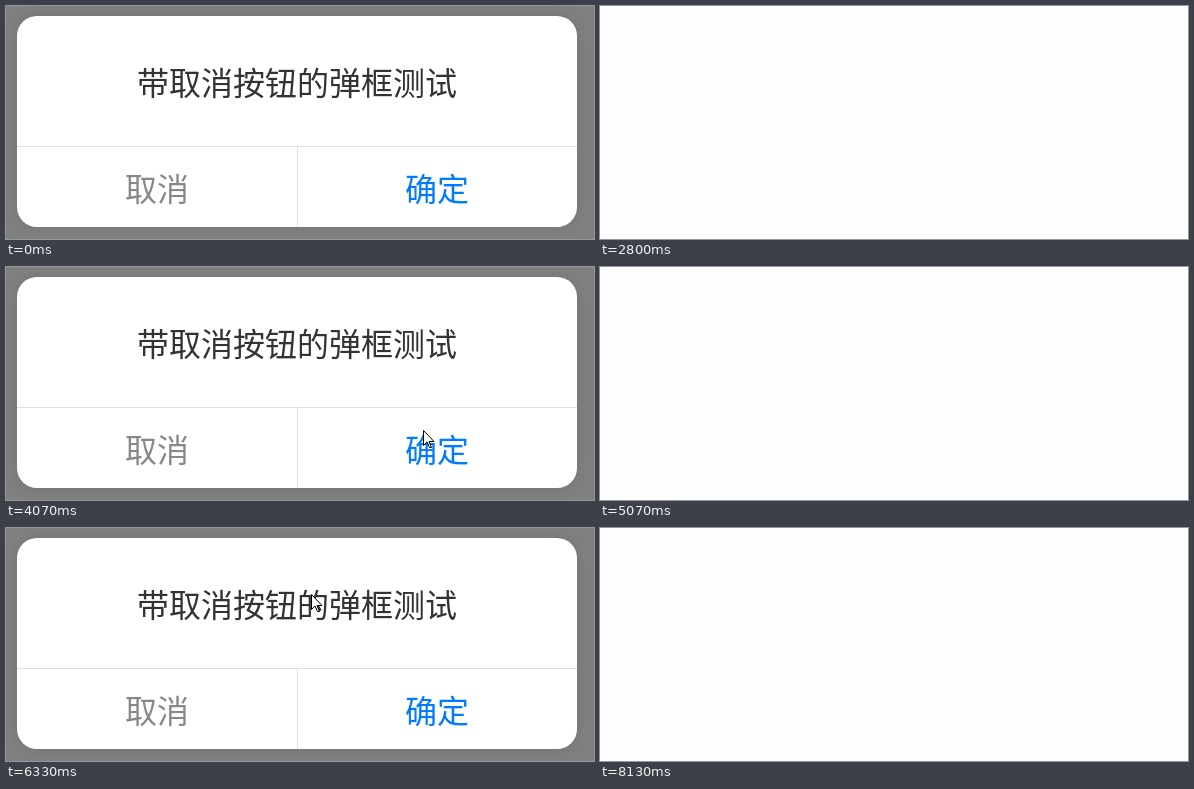
An HTML page with a canvas for the animation above (8790 ms loop, 588 by 233 pixels).

```html
<!DOCTYPE html>
<html lang="zh-CN">
<head>
<meta charset="utf-8">
<title>弹框测试</title>
<style>
html, body { margin: 0; width: 100%; height: 100%; overflow: hidden; background: #fefefe; }
canvas { display: block; }
</style>
</head>
<body>
<canvas id="stage" width="588" height="233"></canvas>
<script>
const W = 588, H = 233, LOOP = 8790, FPS = 15, PAD = 30;
const BOX = { x: 11, y: 10, w: 560, h: 211, r: 20 };
const CENTER = { x: 291, y: 115.5 };
const SPLIT_Y = 140;

const ctx = document.getElementById('stage').getContext('2d');
const layer = document.createElement('canvas');
layer.width = W + 2 * PAD;
layer.height = H + 2 * PAD;
const panel = layer.getContext('2d');
panel.translate(PAD, PAD);

// Times are in ticks of 1/15 s.
const sessions = [
  { open: -9, end: 42 },
  { open: 43, press: 71, end: 73, button: 'confirm' },
  { open: 93, press: 114, end: 116, button: 'cancel' }
];

// Pointer paths: [tick, x, y]; the pointer is hidden outside of them.
const paths = [
  [[5, 233, 67], [6, 42, 199]],
  [[53, 128, 55], [57, 300, 108], [61, 417, 163], [64, 431, 189], [74, 431, 189], [75, 440, 222]],
  [[95, 305, 66], [98, 215, 135], [102, 159, 183], [105, 159, 183], [106, 153, 183],
   [107, 155, 183], [119, 155, 183], [120, 147, 203], [121, 138, 222]]
];

function label(text, x, baseline, color) {
  panel.fillStyle = color;
  panel.fillText(text, x, baseline);
}

function paintPanel(pressed) {
  panel.clearRect(-PAD, -PAD, layer.width, layer.height);
  panel.save();
  panel.beginPath();
  panel.roundRect(BOX.x, BOX.y, BOX.w, BOX.h, BOX.r);
  panel.shadowColor = 'rgba(0,0,0,.1)';
  panel.shadowBlur = 16;
  panel.fillStyle = '#fff';
  panel.fill();
  panel.shadowColor = 'transparent';
  panel.clip();

  if (pressed) {
    panel.fillStyle = '#f4f4f4';
    panel.fillRect(pressed === 'cancel' ? BOX.x : CENTER.x, SPLIT_Y, BOX.w / 2, 81);
  }
  panel.fillStyle = '#dfdfdf';
  panel.fillRect(BOX.x, SPLIT_Y, BOX.w, 1);
  panel.fillRect(CENTER.x, SPLIT_Y, 1, 81);

  panel.font = '32px "Noto Sans CJK SC", "Noto Sans CJK", sans-serif';
  panel.textAlign = 'center';
  label('带取消按钮的弹框测试', 291, 89, '#333');
  label('取消', 151, 195, '#888');
  label('确定', 431, 195, '#007aff');
  panel.restore();
}

function drawDialog({ open, press, button }, tick) {
  const closing = tick >= press;
  const shown = closing ? 1 - (tick - press) / 2 : Math.min(1, (tick - open + 0.7) / 2.2);
  const scale = 0.8 + 0.2 * shown;
  ctx.fillStyle = '#808080';
  ctx.fillRect(0, 0, W, H);
  paintPanel(closing && button);
  ctx.save();
  ctx.globalAlpha = shown;
  ctx.translate(CENTER.x, CENTER.y);
  ctx.scale(scale, scale);
  ctx.drawImage(layer, -CENTER.x - PAD, -CENTER.y - PAD);
  ctx.restore();
}

function drawPageEdge() {
  const fade = ctx.createLinearGradient(176, 0, 192, 0);
  fade.addColorStop(0, 'rgba(0,0,0,0)');
  fade.addColorStop(1, 'rgba(0,0,0,.012)');
  ctx.fillStyle = fade;
  for (let y = 231; y < H; y++) ctx.fillRect(176, y, W - 176, H - y);
}

function pointerAt(tick) {
  const path = paths.find(p => tick >= p[0][0] && tick <= p[p.length - 1][0]);
  if (!path) return null;
  const next = path.findIndex(point => point[0] >= tick);
  const [t1, x1, y1] = path[next];
  const [t0, x0, y0] = path[Math.max(0, next - 1)];
  const k = t1 > t0 ? (tick - t0) / (t1 - t0) : 1;
  return [Math.round(x0 + (x1 - x0) * k), Math.round(y0 + (y1 - y0) * k)];
}

function drawPointer([x, y]) {
  ctx.save();
  ctx.translate(x + 0.5, y + 0.5);
  ctx.fill(arrow);
  ctx.stroke(arrow);
  ctx.restore();
}

const arrow = new Path2D('M0 0V15L3.5 11.5L6 17H8L5.5 11H10.5Z');

function draw(now) {
  const tick = Math.floor((now % LOOP + 5) * FPS / 1000);
  ctx.fillStyle = '#fefefe';
  ctx.fillRect(0, 0, W, H);

  const session = sessions.find(s => tick >= s.open && tick < s.end);
  if (session) drawDialog(session, tick);
  else if (tick >= 116) drawPageEdge();

  const pointer = pointerAt(tick);
  if (pointer) {
    ctx.fillStyle = '#fff';
    ctx.strokeStyle = '#000';
    ctx.lineWidth = 1;
    drawPointer(pointer);
  }
}

let start;
function frame(now) {
  start ??= now;
  draw(now - start);
  requestAnimationFrame(frame);
}
draw(0);
requestAnimationFrame(frame);
</script>
</body>
</html>
```
